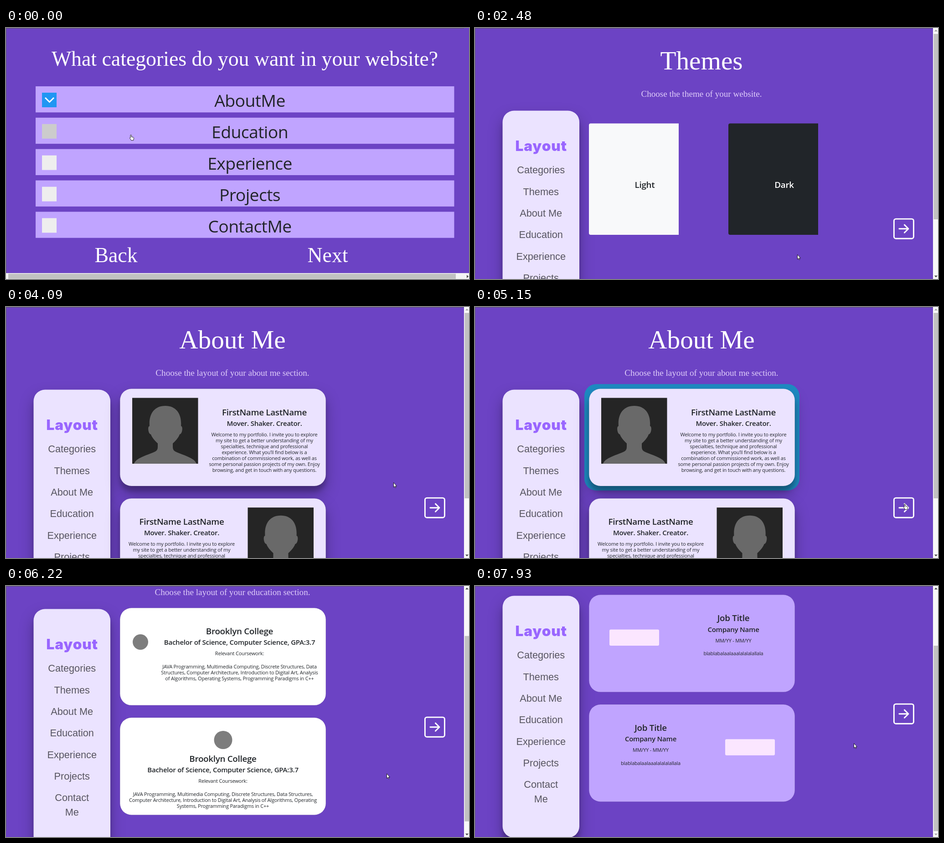
Recreate the animation shown at these times as an HTML page. Size 1016x551 px, loop 8000 ms.

```html
<!DOCTYPE html>
<html lang="en">
<head>
<meta charset="utf-8">
<title>Website layout wizard</title>
<style>
  html, body { margin: 0; width: 100%; height: 100%; overflow: hidden; background: #6c43c4; }
  svg { display: block; width: 1016px; height: 551px; }
  text { text-anchor: middle; fill: #212529; font-family: "Open Sans", "Noto Sans", sans-serif; letter-spacing: -.015em; }
  .serif { font-family: "Liberation Serif", serif; fill: #fff; letter-spacing: 0; }
  .question { font-size: 45.8px; }
  .title { font-size: 57.2px; }
  .subtitle { font-size: 19.1px; fill: #dfcdfa; }
  .category { font-size: 37.3px; }
  .logo { font: 900 31.5px Inter, sans-serif; fill: #9966ff; letter-spacing: .028em; }
  .menu { font: 21.7px "Liberation Sans", sans-serif; fill: #575560; letter-spacing: 0; }
  .h1 { font-size: 18.8px; font-weight: 600; }
  .h2 { font-size: 15px; font-weight: 600; }
  .body { font-size: 10.95px; }
  .card { stroke: rgba(0, 0, 0, .125); stroke-width: .8; }
  .shadow { filter: drop-shadow(0 12px 4.7px rgba(0, 0, 0, .18)) drop-shadow(0 15px 15px rgba(0, 0, 0, .28)); }
  .line { fill: none; stroke: #fff; stroke-width: 2.9; stroke-linecap: round; stroke-linejoin: round; }
  .cursor { fill: #fff; stroke: #111; stroke-width: .9; stroke-linejoin: round; }
</style>
</head>
<body>
<svg id="stage" viewBox="0 0 1016 551"></svg>
<script>
const LOOP = 8000;
const LILAC = '#c0a4ff', PALE = '#ebe3ff', BLUE = '#1e8bc3';
const CARD_GAP = 240.7;

const rect = (x, y, w, h, fill, extra = '') =>
  `<rect x="${x}" y="${y}" width="${w}" height="${h}" fill="${fill}" ${extra}/>`;
const text = (cls, x, y, str) => `<text class="${cls}" x="${x}" y="${y}">${str}</text>`;
const lines = (cls, x, y, step, list) => list.map((s, i) => text(cls, x, y + i * step, s)).join('');
const selection = shape => `<g class="selection">${shape}</g>`;
const card = (y, fill, cls = '') => rect(250.2, y, 451.6, 213.5, fill, `rx="25" class="card ${cls}"`);
const cardFrame = selection(rect(240, 169.3, 472, 233.5, BLUE, 'rx="26"'));

// Category checklist
const categories = ['AboutMe', 'Education', 'Experience', 'Projects', 'ContactMe'];
const rowY = i => 128 + i * 68.85;

function categoryPage() {
  const rows = categories.map((name, i) => {
    const y = rowY(i);
    return rect(65, y, 918.5, 57.3, LILAC)
      + rect(79, y + 14, 32, 32, '#eee', 'class="box"')
      + `<path class="tick line" style="stroke-linecap:butt;stroke-linejoin:miter" d="M86 ${y + 25}l9.5 9.5 9.5-9.5"/>`
      + text('category', 535, y + 45.3, name);
  }).join('');
  return text('serif question', 524, 83, 'What categories do you want in your website?')
    + rows
    + text('serif question', 241.5, 514, 'Back')
    + text('serif question', 706, 514, 'Next')
    + rect(661, 516.3, 89.5, 3, '#fff', 'id="underline"')
    + rect(0, 538, 1016, 13, '#f4f4f4') + rect(5, 539.5, 982, 11, '#c1c1c1')
    + '<path d="M1011 542v7l4-3.5z" fill="#444"/>';
}

// Parts shared by all layout pages
const sidebar = rect(60.5, 181.5, 168.5, 531, PALE, 'rx="25" class="shadow"')
  + text('logo', 145.3, 270, 'Layout')
  + lines('menu', 144.7, 319.2, 47.35,
    ['Categories', 'Themes', 'About Me', 'Education', 'Experience', 'Projects', 'Contact'])
  + text('menu', 144.7, 635, 'Me');

const nextButton = rect(919.4, 419.1, 43.1, 43.1, 'none', 'rx="4.3" class="line"')
  + '<path class="line" d="M930.9 440.7H950M942.4 432.1L951 440.7l-8.6 8.6"/>';

const layoutPage = (title, subtitle, content) =>
  text('serif title', 497, 91, title)
  + text('serif subtitle', 497, 151, `Choose the ${subtitle}.`)
  + sidebar + content + nextButton;

const sheet = (x, fill, label, color) =>
  `<path d="M${x + 197} 209.5V454H${x + 4}q-4 0-4-4V213.5q0-4 4-4z" fill="${fill}"/>`
  + `<text class="h1" x="${x + 122.5}" y="351" style="fill:${color}">${label}</text>`;

const themes = sheet(250, '#f8f9fa', 'Light', '#212529')
  + selection(rect(546.5, 200, 207, 271.5, BLUE))
  + sheet(556, '#212529', 'Dark', '#fff');

const portrait = (x, y) => `<g transform="translate(${x} ${y})">` + rect(0, 0, 144.5, 144.5, '#252525')
  + `<path fill="#696969" d="M4 144.5C8 132 30 127 50 118Q56 115 56 108V100C47 92 42 84 41 80
     35 80 33 62 38 62 36 36 48 17.5 72.5 17.5S109 36 107 62C112 62 110 80 104 80 103 84 98 92 89 100
     V108Q89 115 95 118C115 127 137 132 141 144.5Z"/></g>`;

const welcome = [
  'Welcome to my portfolio. I invite you to explore',
  'my site to get a better understanding of my',
  'specialties, technique and professional',
  'experience. What you’ll find below is a',
  'combination of commissioned work, as well as',
  'some personal passion projects of my own. Enjoy',
  'browsing, and get in touch with any questions.'];

const aboutCard = (dy, textX, photoX) => card(179.5 + dy, PALE, 'shadow')
  + portrait(photoX, 199.5 + dy)
  + text('h1', textX, 237.5 + dy, 'FirstName LastName')
  + text('h2', textX, 260.5 + dy, 'Mover. Shaker. Creator.')
  + lines('body', textX, 283.5 + dy, 13.1, welcome);

const about = cardFrame + aboutCard(0, 567, 277) + aboutCard(CARD_GAP, 385.5, 530.5);

const seal = (x, y, r) => `<circle cx="${x}" cy="${y}" r="${r}" fill="#7d7d7d"/>`;
const educationText = (x, y, courses) => text('h1', x, y, 'Brooklyn College')
  + text('h2', x, y + 23, 'Bachelor of Science, Computer Science, GPA:3.7')
  + text('body', x, y + 46.3, 'Relevant Coursework:')
  + lines('body', x, y + 75, 13.1, courses);

const education = cardFrame
  + card(179.3, '#fff') + seal(295, 254, 17)
  + educationText(512.5, 237, [
    'JAVA Programming, Multimedia Computing, Discrete Structures, Data',
    'Structures, Computer Architecture, Introduction to Digital Art, Analysis',
    'of Algorithms, Operating Systems, Programming Paradigms in C++'])
  + card(420, '#fff') + seal(476.5, 469, 20)
  + educationText(476, 517, [
    'JAVA Programming, Multimedia Computing, Discrete Structures, Data Structures,',
    'Computer Architecture, Introduction to Digital Art, Analysis of Algorithms, Operating',
    'Systems, Programming Paradigms in C++']);

const jobCard = (dy, textX, plateX) => card(179.3 + dy, LILAC)
  + rect(plateX, 255.5 + dy, 109, 35.5, '#fbe6ff', 'rx="3"')
  + text('h1', textX, 237.3 + dy, 'Job Title')
  + text('h2', textX, 260.5 + dy, 'Company Name')
  + text('body', textX, 283.5 + dy, 'MM/YY - MM/YY')
  + text('body', textX, 312.3 + dy, 'blablabalaalaaalalalalallala');

const experience = jobCard(0, 567, 295) + jobCard(CARD_GAP, 385.5, 549);

const pages = [
  categoryPage(),
  layoutPage('Themes', 'theme of your website', themes),
  layoutPage('About Me', 'layout of your about me section', about),
  layoutPage('Education', 'layout of your education section', education),
  layoutPage('Experience', 'layout of your experience section', experience)];

const scrollbar = '<g id="scrollbar">' + rect(1005, 0, 11, 551, '#f8f8f8')
  + rect(1006.5, 13, 9.5, 407, '#c1c1c1', 'id="thumb"')
  + '<path id="up" d="M1008 7.5h7l-3.5-4z"/><path id="down" d="M1008 543.5h7l-3.5 4z"/></g>';

const cursors = `<path id="hand" class="cursor" d="M3 .5C4 .5 4.3 1.1 4.3 1.9V5l3.6.8c1.2.3 1.6.8 1.6 1.8
    0 2-.8 3.3-.9 5H3.6C3 10.6.8 8.5.6 7.6.5 6.7 1.5 6.4 2.1 7.1V1.9C2.1 1 2.3.5 3 .5z"/>
  <path id="arrow" class="cursor" d="M.5.5V10.7L2.8 8.6 4.3 12 5.8 11.3 4.3 8H7.4z"/>`;

const stage = document.getElementById('stage');
stage.innerHTML = rect(0, 0, 1016, 551, '#6c43c4')
  + pages.map(p => `<g class="page">${p}</g>`).join('')
  + scrollbar
  + rect(0, 0, 1005, 1, '#5b5568') + rect(0, 0, 1, 538, '#5f5a80')
  + cursors;

// Each step holds until the next: [ms, cursor x, cursor y, other changes]
const steps = [
  [0, 271, 234, { page: 0, checked: 1, hover: 1, hand: true, underline: false, selected: false, scroll: 0 }],
  [250, 271, 234, { checked: 2 }],
  [400, 270, 285, { hover: 2 }],
  [530, 270, 298, { checked: 3 }],
  [800, 271, 380, { hover: 3 }],
  [1080, 271, 380, { checked: 4 }],
  [1210, 272, 430, { hover: 4 }],
  [1350, 272, 436, { checked: 5 }],
  [1620, 330, 443, {}],
  [1760, 480, 478, { hand: false, hover: -1 }],
  [1900, 620, 505, {}],
  [2050, 744, 517, { hand: true, underline: true }],
  [2170, 704, 497, {}],
  [2480, 707, 497, { page: 1, hand: false }],
  [2610, 702, 474, {}],
  [2740, 690, 430, { hand: true }],
  [2860, 675, 390, {}],
  [2990, 665, 362, {}],
  [3270, 665, 362, { selected: true }],
  [3410, 735, 377, {}],
  [3560, 858, 412, { hand: false }],
  [3690, 923, 427, { hand: true }],
  [3940, 923, 427, { page: 2, selected: false }],
  [4080, 850, 385, { hand: false }],
  [4210, 749, 339, {}],
  [4330, 618, 302, { hand: true }],
  [4760, 618, 302, { selected: true }],
  [4890, 725, 350, { hand: false }],
  [5020, 880, 412, {}],
  [5150, 940, 432, { hand: true }],
  [5430, 940, 432, { page: 3, selected: false }],
  [5560, 900, 424, { hand: false }],
  [5700, 850, 414, {}],
  [5960, 835, 411.5, { scroll: 18 }],
  [6090, 835, 411.5, { scroll: 76 }],
  [6220, 835, 411.5, { scroll: 131 }],
  [6340, 835, 411.5, { scroll: 160 }],
  [6590, 690, 262, { hand: true }],
  [6710, 592, 192, {}],
  [6990, 592, 192, { selected: true }],
  [7120, 790, 247, { hand: false }],
  [7260, 921.5, 280, { hand: true }],
  [7660, 921.5, 280, { page: 4, selected: false }],
  [7800, 870, 318, { hand: false }],
  [7930, 831, 345, {}]];

let current = {};
const states = steps.map(([time, x, y, change]) => current = { ...current, ...change, time, x, y });

const all = selector => [...stage.querySelectorAll(selector)];
const byId = id => document.getElementById(id);
const show = (el, on) => { el.style.display = on ? '' : 'none'; };
const pageEls = all('.page'), boxes = all('.box'), ticks = all('.tick'), selections = all('.selection');

function render(s) {
  pageEls.forEach((el, i) => {
    show(el, i === s.page);
    el.setAttribute('transform', `translate(0 ${-s.scroll})`);
  });
  boxes.forEach((box, i) => {
    const on = i < s.checked;
    box.setAttribute('fill', on ? '#2196f3' : i === s.hover ? '#ccc' : '#eee');
    show(ticks[i], on);
  });
  show(byId('underline'), s.underline);
  selections.forEach(el => show(el, s.selected));
  show(byId('scrollbar'), s.page > 0);
  byId('thumb').setAttribute('y', 13 + s.scroll * .738);
  byId('up').setAttribute('fill', s.scroll > 0 ? '#444' : '#a3a3a3');
  byId('down').setAttribute('fill', s.scroll < 160 ? '#444' : '#a3a3a3');
  for (const [id, on] of [['hand', s.hand], ['arrow', !s.hand]]) {
    show(byId(id), on);
    byId(id).setAttribute('transform', `translate(${s.x} ${s.y})`);
  }
}

let shown = null;
const start = performance.now();
function tick() {
  const t = (performance.now() - start) % LOOP;
  const state = states.findLast(s => s.time <= t) || states[0];
  if (state !== shown) render(shown = state);
  requestAnimationFrame(tick);
}
tick();
</script>
</body>
</html>
```
